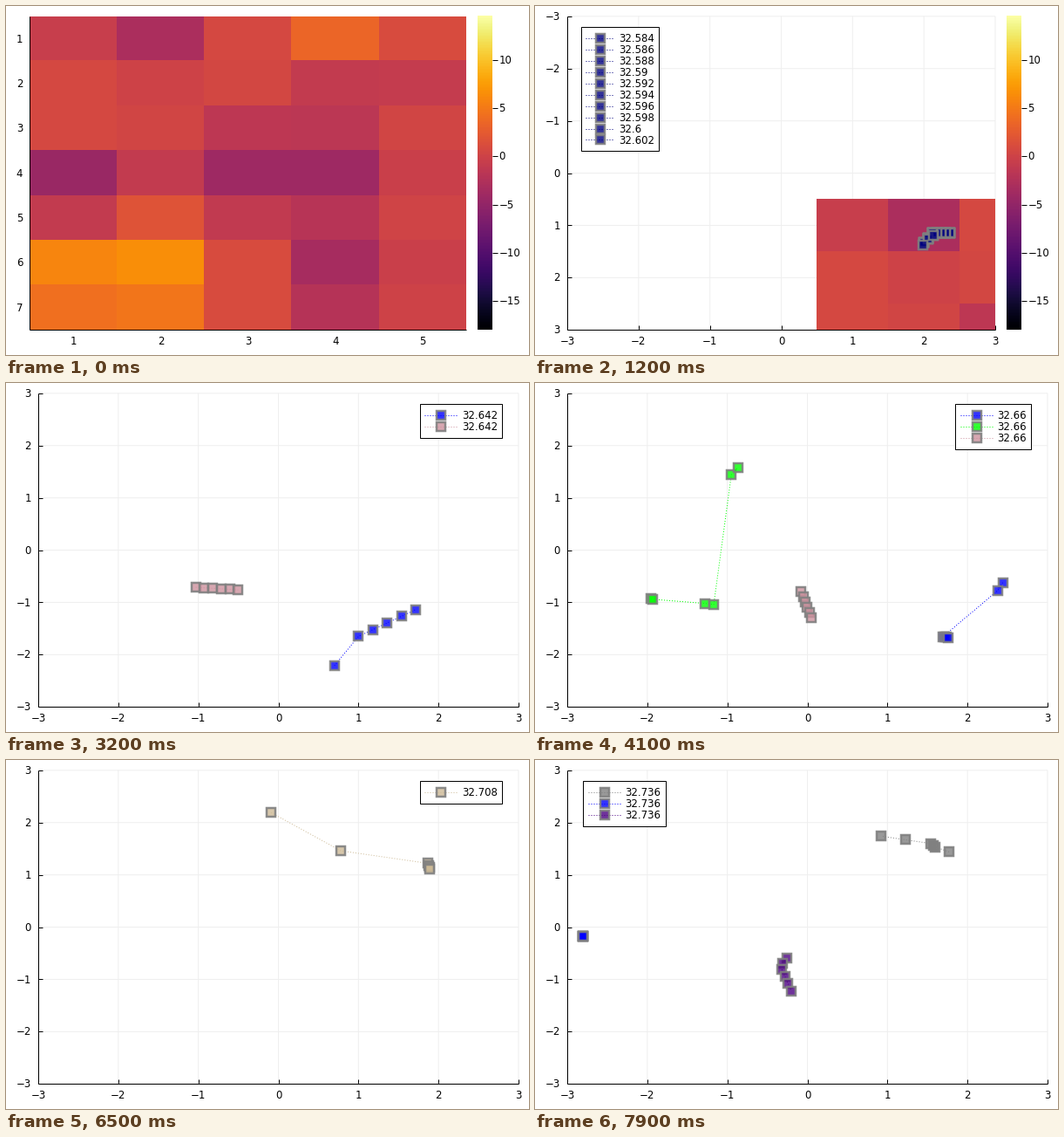
Animation of 600x400 px, one loop 8000 ms. Source, as a matplotlib script:

```python
import numpy as np
import matplotlib.pyplot as plt
from matplotlib.animation import FuncAnimation
from matplotlib.patches import Rectangle

W, H, DPI = 600, 400, 100
PX = 72 / DPI            # one pixel in points
FRAMES, INTERVAL = 80, 100
TOP, BOTTOM = 11.8, 371.3
FONT = 11.75             # text size in pixels
TRAIL = 6                # positions kept in a trail
LOW, HIGH = -18.0, 14.5  # colour scale
BLACK, GRID = "black", "#efefef"
CMAP = plt.get_cmap("inferno")

# Warm and cold spots of the heatmap: row, column, height, spread.
SPOTS = [(6.2, 1.6, 6.5, 1.2), (4.4, 1, -7.2, 0.75), (4, 3.5, -6, 1.2),
         (6.4, 4, -5, 0.9), (1, 1.8, -4.3, 0.8), (1, 4, 2.6, 0.6),
         (2, 4.5, -3.6, 0.6)]


class Track:
    """A point that moves through a few keys (step, x, y)."""

    def __init__(self, color, end, keys, wobble=0):
        self.color, self.end, self.wobble = color, end, wobble
        self.t, self.x, self.y = np.array(keys).T
        self.start = int(self.t[0])

    def trail(self, step):
        k = np.arange(max(self.start, step - TRAIL + 1), step + 1)
        x, y = np.interp(k, self.t, self.x), np.interp(k, self.t, self.y)
        if self.wobble:  # restless until the second key
            y += self.wobble * np.sin(1.9 * (k - 19) + 0.45) * (k <= self.t[1])
        return x, y


OPENING = Track("navy", 13, [(3, 2.36, 1.15), (7, 2.12, 1.15), (9, 2.0, 1.32),
                             (11, 2.13, 1.2), (12, 1.98, 1.37)])
TRACKS = [
    Track("blue", 47, [(26, 0.4, -2.77), (28, 1.0, -1.65), (36, 2.44, -0.62),
                       (37, 2.38, -0.77), (38, 1.69, -1.66), (41, 1.76, -1.67)]),
    Track("lime", 52, [(34, -2.0, -0.92), (37, -1.93, -0.94), (38, -1.28, -1.02),
                       (39, -1.17, -1.04), (40, -0.95, 1.44), (41, -0.87, 1.58)]),
    Track("#cd919e", 52, [(16, -1.5, -0.68), (24, -1.35, -0.68), (36, -0.08, -0.8),
                          (41, 0.05, -1.3), (51, 0.4, -1.5)], wobble=0.14),
    Track("orange", 60, [(52, 1.94, -1.58), (53, 1.76, -1.63),
                         (54, -1.26, -2.22), (56, -2.2, -2.92)]),
    Track("#cdba96", 70, [(60, -0.09, 2.19), (61, 0.78, 1.46),
                          (62, 1.87, 1.22), (69, 1.92, 0.98)]),
    Track("gray", 80, [(70, 1.93, 1.2), (74, 1.77, 1.44), (75, 1.6, 1.53),
                       (77, 1.54, 1.6), (79, 0.92, 1.74)]),
    Track("blue", 80, [(75, -2.8, -0.18)]),
    Track("indigo", 80, [(73, -0.2, -0.5), (75.5, -0.34, -0.74),
                         (79, -0.2, -1.22)]),
]

plt.rcParams["font.family"] = "DejaVu Sans"
fig = plt.figure(figsize=(W / DPI, H / DPI), dpi=DPI, facecolor="white")
ax = fig.add_axes([0, 0, 1, 1])


class View:
    """Maps data units to stage pixels."""

    def __init__(self, left, right, xlim, ylim):
        self.left, self.right = left, right
        self.xlim, self.ylim = xlim, ylim
        self.scale = (right - left) / 551

    def x(self, v):
        a, b = self.xlim
        return self.left + (v - a) / (b - a) * (self.right - self.left)

    def y(self, v):
        a, b = self.ylim
        return BOTTOM - (v - a) / (b - a) * (BOTTOM - TOP)


HEAT = View(27.4, 528, (0.5, 5.5), (7.5, 0.5))
OVERLAY = View(37, 528, (-3, 3), (3, -3))
PLAIN = View(37, 588, (-3, 3), (-3, 3))


def line(xs, ys, color=BLACK, **kw):
    ax.plot(xs, ys, color=color, lw=PX, solid_capstyle="butt", **kw)


def label(x, y, text, ha):
    ax.text(x, y + 0.35 * FONT, text, ha=ha, va="baseline", fontsize=FONT * PX)


def number(v):
    return f"{v}".replace("-", "\u2212")


def dotted(xs, ys, color):
    line(xs, ys, color, ls=(0, (1, 2)), dash_capstyle="butt")


def squares(xs, ys, color):
    ax.plot(xs, ys, ls="none", marker="s", ms=10 * PX, mew=2.5 * PX,
            mfc=(color, 0.8), mec=("gray", 0.9))


def draw_axes(view, xticks, yticks, ticks=True):
    for v in xticks:
        x = view.x(v)
        if ticks:
            line([x, x], [TOP, BOTTOM], GRID, snap=False)
            line([x, x], [BOTTOM - 5, BOTTOM])
        label(x, 383.5, number(v), "center")
    for v in yticks:
        y = view.y(v)
        if ticks:
            line([view.left, view.right], [y, y], GRID, snap=False)
            line([view.left, view.left + 5], [y, y])
        label(view.left - 8.2, y, number(v), "right")
    line([view.left, view.left], [TOP, BOTTOM], zorder=3)
    line([view.left, view.right], [BOTTOM, BOTTOM], zorder=3)


def draw_heatmap(view):
    row, col = np.mgrid[1:8, 1:6]
    heat = 0.9 + sum(h * np.exp(-((row - r) ** 2 + (col - c) ** 2) / s ** 2)
                     for r, c, h, s in SPOTS)
    image = ax.imshow(heat, cmap=CMAP, vmin=LOW, vmax=HIGH, aspect="auto",
                      interpolation="nearest", zorder=2,
                      extent=(view.x(0.5), view.x(5.5), view.y(7.5), view.y(0.5)))
    image.set_clip_path(Rectangle((view.left, TOP), view.right - view.left,
                                  BOTTOM - TOP, transform=ax.transData))


def draw_colorbar():
    ramp = np.linspace(1, 0, 256)[:, None]
    ax.imshow(ramp, cmap=CMAP, vmin=0, vmax=1, aspect="auto",
              extent=(541, 558, BOTTOM, TOP))
    for v in range(-15, 11, 5):
        y = BOTTOM - (v - LOW) / (HIGH - LOW) * (BOTTOM - TOP)
        line([558, 564], [y, y])
        label(565.5, y, number(v), "left")


def draw_trail(view, track, step):
    x, y = track.trail(step)
    dotted(view.x(x), view.y(y), track.color)
    squares(view.x(x), view.y(y), track.color)


def clock(step):
    return f"{32.578 + 0.002 * step:.3f}".rstrip("0")


def draw_legend(view, entries, on_left):
    s, gap = view.scale, 12.94
    longest = max(len(text) for _, text in entries)
    width = 53.6 * s + (0.636 * longest - 0.318) * FONT
    inset = 18.6 * s
    x = view.left + inset - 0.6 if on_left else view.right - inset - width
    ax.add_patch(Rectangle((x, 24), width, 26 + gap * (len(entries) - 1),
                           fc="white", ec=BLACK, lw=PX, zorder=2))
    for k, (color, text) in enumerate(entries):
        y = 37 + gap * k
        dotted([x + 5.5 * s, x + 43 * s], [y, y], color)
        squares([x + 24.5 * s], [y], color)
        label(x + 48.3 * s, y, text, "left")


def draw(i):
    ax.clear()
    ax.axis("off")
    ticks = range(-3, 4)
    if i < 3:
        draw_axes(HEAT, range(1, 6), range(1, 8), ticks=False)
        draw_heatmap(HEAT)
        draw_colorbar()
    elif i < 16:
        steps = range(3, min(i, 12) + 1)
        draw_axes(OVERLAY, ticks, ticks)
        draw_heatmap(OVERLAY)
        draw_colorbar()
        for k in steps:
            draw_trail(OVERLAY, OPENING, k)
        draw_legend(OVERLAY, [(OPENING.color, clock(k)) for k in steps], True)
    else:
        live = [t for t in TRACKS if t.start <= i < t.end]
        draw_axes(PLAIN, ticks, ticks)
        for t in live:
            draw_trail(PLAIN, t, i)
        draw_legend(PLAIN, [(t.color, clock(i)) for t in live], i >= 72)
    ax.set(xlim=(0, W), ylim=(H, 0))
    return []


anim = FuncAnimation(fig, draw, frames=FRAMES, interval=INTERVAL,
                     init_func=lambda: [], repeat=True, repeat_delay=0)
plt.show()
```
